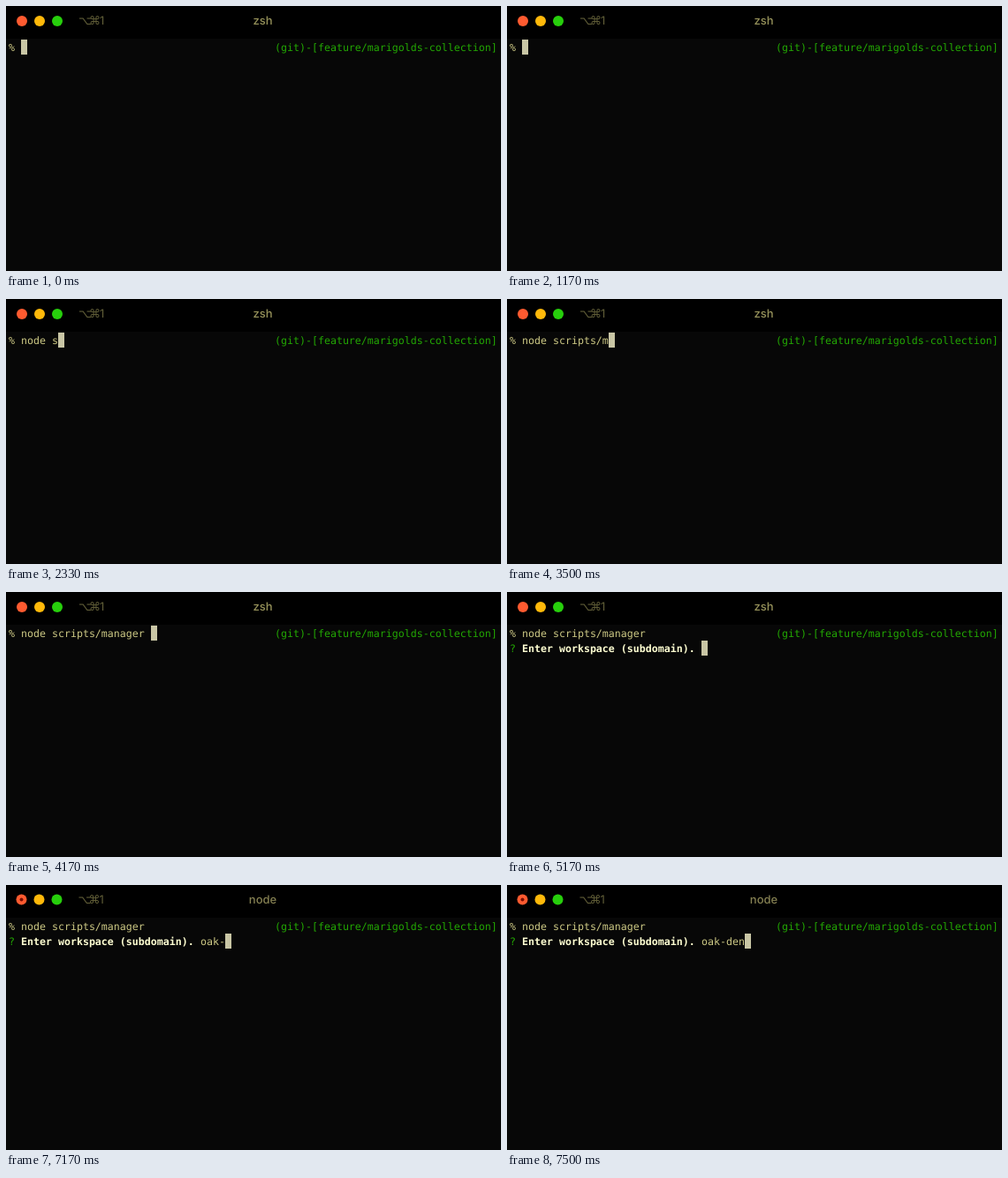
These frames come from a looping animation (560 by 300 pixels, 8000 ms). An HTML page:

```html
<!DOCTYPE html>
<html lang="en">
<head>
<meta charset="utf-8">
<title>Terminal</title>
<style>
  html, body { margin: 0; width: 100%; height: 100%; overflow: hidden; background: #000; }
  svg { display: block; width: 560px; height: 300px; }
  text { white-space: pre; text-rendering: geometricPrecision; }
  .mono { font: 11.627px "DejaVu Sans Mono", monospace; fill: #cdc985; }
  .mono.bold { font-weight: 700; fill: #ffffd2; }
  .mono.green { fill: #23a803; }
  .title { font: 500 13px Inter, Roboto, sans-serif; fill: #96925a; text-anchor: middle; }
  .keys { font: 13px "DejaVu Sans", Inter, sans-serif; fill: #625f38; }
  .keys .digit { font-family: Inter, Roboto, sans-serif; }
</style>
</head>
<body>
<svg viewBox="0 0 560 300">
  <rect width="560" height="300" fill="#070707"/>
  <rect width="560" height="37" fill="#000"/>
  <g id="bar">
    <circle cx="18" cy="17" r="6" fill="#ff5b30"/>
    <circle cx="38" cy="17" r="6" fill="#ffb90a"/>
    <circle cx="58" cy="17" r="6" fill="#27cf0c"/>
    <circle id="busy" cx="18" cy="17" r="2" fill="#7a0d00"/>
    <text class="keys" y="21"><tspan x="82">⌥</tspan><tspan x="94">⌘</tspan><tspan class="digit" x="106">1</tspan></text>
  </g>
  <text id="title" class="title" x="290.5" y="21"></text>

  <text class="mono" x="3" y="51">%</text>
  <text id="command" class="mono" x="17" y="51"></text>
  <text class="mono green" x="304" y="51">(git)-[feature/marigolds-collection]</text>

  <g id="question">
    <text class="mono green" x="3" y="68">?</text>
    <text class="mono bold" x="17" y="68">Enter workspace (subdomain).</text>
  </g>
  <text id="answer" class="mono" x="220" y="68"></text>
  <rect id="cursor" width="7" height="17" fill="#c9c6a5"/>
</svg>
<script>
  const LOOP = 8000, CELL = 7, LEFT = 3, TOP = 38, ROW = 17;
  const ENTER = 4830, ASK = 5170, RUNNING = 5500;
  const COMMAND_COL = 2, ANSWER_COL = 31;

  // [time, text on the line from then on]
  const command = [
    [0, ""], [1330, "n"], [1500, "no"], [1670, "nod"], [1830, "node"],
    [2170, "node "], [2330, "node s"], [2500, "node sc"],
    [2830, "node scripts/"], [3500, "node scripts/m"],
    [3830, "node scripts/ma"], [4170, "node scripts/manager "]
  ];
  const answer = [
    [0, ""], [6000, "o"], [6170, "oa"], [6330, "oak"],
    [7170, "oak-"], [7330, "oak-de"], [7500, "oak-den"]
  ];

  const $ = id => document.getElementById(id);
  const ui = Object.fromEntries(
    ["bar", "busy", "title", "command", "question", "answer", "cursor"].map(id => [id, $(id)])
  );

  const textAt = (steps, t) => steps.filter(([start]) => start <= t).pop()[1];
  const show = (el, on) => el.setAttribute("visibility", on ? "visible" : "hidden");
  const write = (el, text) => { if (el.textContent !== text) el.textContent = text; };

  function placeCursor(col, row) {
    ui.cursor.setAttribute("x", LEFT + col * CELL);
    ui.cursor.setAttribute("y", TOP + row * ROW);
  }

  function draw(t) {
    const typed = textAt(command, t), reply = textAt(answer, t);
    const running = t >= RUNNING;
    write(ui.command, typed);
    write(ui.answer, reply);
    write(ui.title, running ? "node" : "zsh");
    ui.title.style.fill = running ? "#858052" : "#96925a";
    ui.bar.setAttribute("transform", running ? "translate(-0.5 -0.5)" : "");
    show(ui.busy, running);
    show(ui.question, t >= ASK);

    if (t < ENTER) placeCursor(COMMAND_COL + typed.length, 0);
    else if (t < ASK) placeCursor(0, 1);
    else placeCursor(ANSWER_COL + reply.length, 1);
  }

  const origin = performance.now();
  function tick() {
    draw((performance.now() - origin) % LOOP);
    requestAnimationFrame(tick);
  }
  draw(0);
  requestAnimationFrame(tick);
</script>
</body>
</html>
```
